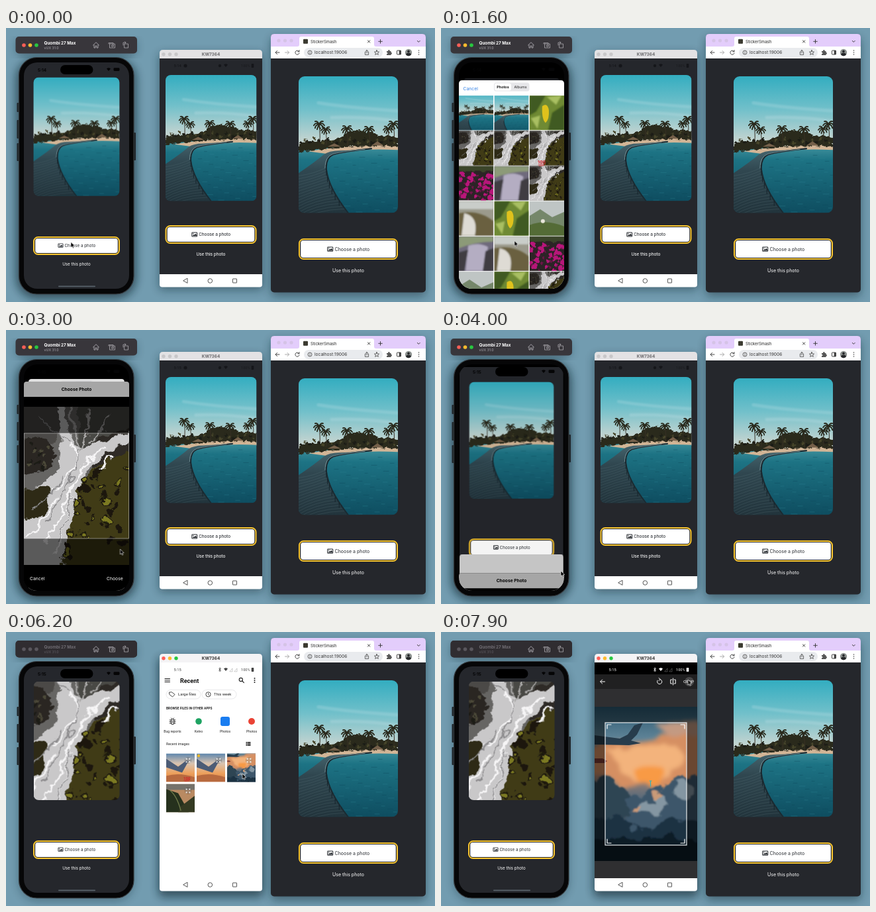
Write an HTML page that moves like this. It is 648 by 414 pixels and loops after 8 s.

```html
<!DOCTYPE html>
<html lang="en">
<head>
<meta charset="utf-8">
<title>Choose a photo</title>
<style>
html, body { margin: 0; width: 100%; height: 100%; overflow: hidden; background: #729cb0; }
svg { display: block; }
text { font-family: Inter, "Open Sans", sans-serif; }
.rb text, text.rb { font-family: Roboto, "Noto Sans", sans-serif; }
.ln { fill: none; stroke-linecap: round; stroke-linejoin: round; }
.mid { text-anchor: middle; }
.b { font-weight: 700; }

.early, .late, .clk14, .clk15, .shot1, .shot2, .tick, .grid, .press { animation: 8s step-end infinite; }
.early { animation-name: early; }
.late { animation-name: late; }
.clk14 { animation-name: clk14; }
.clk15 { animation-name: clk15; }
.shot1 { animation-name: shot1; }
.shot2 { animation-name: shot2; }
.tick { animation-name: tick; }
.grid { animation-name: grid; }
.press { animation-name: press; }
@keyframes early { 0% { opacity: 1 } 65%, 100% { opacity: 0 } }
@keyframes late { 0% { opacity: 0 } 65%, 100% { opacity: 1 } }
@keyframes clk14 { 0% { opacity: 1 } 33.75%, 100% { opacity: 0 } }
@keyframes clk15 { 0% { opacity: 0 } 33.75%, 100% { opacity: 1 } }
@keyframes shot1 { 0% { opacity: 1 } 55%, 100% { opacity: 0 } }
@keyframes shot2 { 0% { opacity: 0 } 55%, 100% { opacity: 1 } }
@keyframes tick { 0% { opacity: 0 } 27.5%, 100% { opacity: 1 } }
@keyframes grid { 0% { opacity: 1 } 48.25%, 100% { opacity: 0 } }
@keyframes press { 0% { opacity: 0 } 97.4%, 100% { opacity: 1 } }

.card, .shade, .sheet, .dim, .editor { animation: 8s cubic-bezier(.32,.72,0,1) infinite; }
.card { animation-name: card; }
.shade { animation-name: shade; }
.sheet { animation-name: sheet; }
.dim { animation-name: dim; }
.editor { animation-name: editor; }
@keyframes card {
  0%, 14.875%, 54.5%, 100% { transform: translate(106.5px,52px) scale(1) translate(-106.5px,-52px) }
  21.125%, 48.25% { transform: translate(106.5px,76px) scale(.911) translate(-106.5px,-52px) }
}
@keyframes shade { 0%, 14.875%, 54.5%, 100% { opacity: 0 } 21.125%, 48.25% { opacity: .25 } }
@keyframes sheet {
  0%, 14.875%, 54.5%, 100% { transform: translate(106.5px,394px) scale(1) translate(-106.5px,0px) }
  21.125%, 29.125% { transform: translate(106.5px,78px) scale(1) translate(-106.5px,0px) }
  35.375%, 48.25% { transform: translate(106.5px,74px) scale(.911) translate(-106.5px,0px) }
}
@keyframes dim { 0%, 29.125% { opacity: 0 } 35.375%, 48.2% { opacity: .12 } 48.25%, 100% { opacity: .23 } }
@keyframes editor {
  0%, 29.125% { transform: translate(0px,394px) }
  35.375%, 48.25% { transform: translate(0px,78px) }
  54.5%, 100% { transform: translate(0px,428px) }
}
.picker { animation: picker 8s ease-out infinite; }
@keyframes picker {
  0%, 72.5% { opacity: 0; transform: translate(0px,24px) }
  77%, 100% { opacity: 1; transform: translate(0px,0px) }
}
.crop { animation: crop 8s linear infinite; }
@keyframes crop { 0%, 85.6% { opacity: 0 } 88.5%, 100% { opacity: 1 } }
.cursor { animation: cursor 8s ease-in-out infinite; }
@keyframes cursor {
  0%, 13% { transform: translate(98px,323.5px) }
  16.25%, 19% { transform: translate(109px,326px) }
  25.5%, 31% { transform: translate(147px,234px) }
  41%, 53% { transform: translate(181px,364px) }
  64%, 71% { transform: translate(292px,310.5px) }
  76.5%, 84% { transform: translate(357px,214px) }
  92%, 100% { transform: translate(373px,72px) }
}
</style>
</head>
<body>
<svg id="stage" width="648" height="414" viewBox="0 0 648 414"></svg>
<script>
const rect = (x, y, w, h, fill, r = 0, more = '') =>
  `<rect x="${x}" y="${y}" width="${w}" height="${h}" rx="${r}" fill="${fill}" ${more}/>`;
const dot = (x, y, r, fill, more = '') => `<circle cx="${x}" cy="${y}" r="${r}" fill="${fill}" ${more}/>`;
const text = (x, y, size, str, fill = '#111', cls = '') =>
  `<text x="${x}" y="${y}" font-size="${size}" fill="${fill}" class="${cls}">${str}</text>`;
const line = (d, color, w = 1, more = '') => `<path class="ln" d="${d}" stroke="${color}" stroke-width="${w}" ${more}/>`;
const fill = (d, color, more = '') => `<path d="${d}" fill="${color}" ${more}/>`;
const at = (x, y, body, s = 1) => `<g transform="translate(${x} ${y}) scale(${s})">${body}</g>`;
const group = (cls, body) => `<g class="${cls}">${body}</g>`;
const filtered = (id, body) => `<g filter="url(#${id})">${body}</g>`;
const photo = (id, x, y, w, h, more = '') => `<use href="#${id}" x="${x}" y="${y}" width="${w}" height="${h}" ${more}/>`;
const scene = (id, w, h, body) =>
  `<symbol id="${id}" viewBox="0 0 ${w} ${h}" preserveAspectRatio="xMidYMid slice">${body}</symbol>`;
const fade = (id, ...stops) => `<linearGradient id="${id}" x2="0" y2="1">${
  stops.map(([o, c]) => `<stop offset="${o}" stop-color="${c}"/>`).join('')}</linearGradient>`;
const clip = (id, x, y, w, h, r) => `<clipPath id="${id}">${rect(x, y, w, h, '#000', r)}</clipPath>`;
const lights = (xs, y, r, colors) => xs.map((x, i) => dot(x, y, r, colors[i % colors.length])).join('');
const shadow = (x, y, w, h, r, o) => rect(x, y, w, h, '#10222c', r, `opacity="${o}" filter="url(#soft)"`);
const times = (n, f) => Array.from({ length: n }, (_, i) => f(i)).join('');

// Ragged edges: noise pushes the shapes about, then a light blur
const ragged = (id, freq, push, blur) => `<filter id="${id}"><feTurbulence type="fractalNoise" baseFrequency="${freq}" numOctaves="4" seed="4"/>` +
  `<feDisplacementMap in="SourceGraphic" scale="${push}" xChannelSelector="R" yChannelSelector="G"/><feGaussianBlur stdDeviation="${blur}"/></filter>`;

const INK = '#25272c', GOLD = '#f9c62f';
const MAC = ['#fe5f57', '#febc2e', '#28c840'];

// Photos
const palm = (x, y, s = 1) => at(x, y, line('M0 0Q-4-5-8 1M0 0Q-5-1-6 5M0 0Q-2-6-6-5M0 0Q4-5 8 1M0 0Q5-1 6 5M0 0Q2-6 6-5M0 0Q0 3 2 6M0 0Q-2 3-3 7', '#28291c', 1.9)
  + line('M0 0Q2 14 1 25', '#383025', 1), s);

const pier = scene('pier', 150, 206,
  rect(0, 0, 150, 112, 'url(#sky)') +
  filtered('blur', line('M30 40Q80 48 150 52M50 62Q100 60 150 68', '#d8ecee', 5, 'opacity=".2"')) +
  rect(0, 106, 150, 100, 'url(#sea)') +
  times(60, i => line(`M${46 + (i * 37) % 102} ${116 + i * 1.5}h${4 + i % 6}`, i % 2 ? '#2f8594' : '#0d4557', .7, 'opacity=".55"')) +
  fill('M14 113Q90 101 150 103V111Q90 108 44 117Z', '#d2b596') +
  filtered('leafy', fill('M0 110Q4 96 18 98T40 95Q54 97 62 93Q74 82 84 83Q95 78 104 85Q115 82 121 91Q136 87 150 92V106Q90 102 0 114Z', '#2a2a1d') +
    times(22, i => dot(4 + i * 6.7, 101 - (i * 5) % 8, 2.2, i % 2 ? '#46452b' : '#1a1c14'))) +
  fill('M44 106l10-5 10 5zM110 104l9-6 9 6z', '#75604a') +
  palm(31, 73) + palm(41, 81, .9) + palm(73, 80) + palm(106, 81) + palm(135, 80, .9) + palm(143, 73) +
  fill('M0 146Q24 130 38 118Q46 112 62 112Q92 111 110 108V110Q70 114 53 119Q41 123 42 140Q44 167 74 206H0Z', 'url(#deck)') +
  times(16, i => line(`M0 ${150 + i * 4.6}Q24 ${147 + i * 3.6} ${43 + i * i * .115} ${137 + i * 4.2}`, '#6d868c', .5, 'opacity=".4"')) +
  line('M110 109Q68 113 52 118Q41 123 42 140Q45 168 75 206', '#1b2a31', 2) +
  line('M100 110Q66 113 52 117Q40 121 40 138', '#8fabae', .7) +
  times(7, i => line(`M${41.5 + i * i * .55} ${134 + i * 9}v7`, '#16242b', 1)));

const mossy = (n, color, r) => times(n, i => {
  const y = 62 + (i * 29) % 150;
  return dot(150 - ((i * 43) % (60 + y * .25)), y, r + i % 4, color);
});
const fall = scene('fall', 180, 270, rect(0, 0, 180, 270, '#666563') + at(25, 45, filtered('rough',
  fill('M-40-60H46L40-10L26 18L-40 4Z', '#4b4946') +
  fill('M-40 6L14 8L30 34L16 62L-40 76Z', '#2b2824') +
  fill('M70-60H170V-6Q112 14 74 26Q66 0 70-60Z', '#4a4844') +
  fill('M92 20L120 0L170-16V30L118 48L90 60Z', '#2e2b26') +
  fill('M44-60Q46 0 62 22Q100 26 170-12V6Q104 34 82 62Q64 110 52 180L42 240H-40V112Q10 92 30 66Q46 30 30-60Z', '#c9c8c9') +
  fill('M-40 90L14 96L18 120L4 144L-40 150Z', '#2d2b17') +
  fill('M72 90L90 62L124 42L170 28V240H40Q54 160 72 90Z', '#3f3b18') +
  mossy(34, '#1d1910', 4) + mossy(15, '#7c7a22', 2) + times(12, i => dot(-14 + (i * 17) % 30, 20 + (i * 13) % 44, 3, i % 2 ? '#4c4838' : '#1c1a17')) +
  line('M52 20Q78 34 60 62Q46 84 20 100M112 26Q76 44 62 84Q46 130 10 190M62 92Q50 134 30 200M-20 176Q10 150 30 110M128 36Q112 48 106 62', '#f6f5f6', 3.2) +
  line('M70 30Q66 64 48 92T16 150M58 104Q48 150 30 190M-10 130Q20 110 40 74M4-30Q24 0 50 16', '#8b8a8c', 2) +
  line('M84-40Q92 0 74 30M56-44Q56-10 70 20M120-30Q110 0 90 16', '#a9a8a7', 3))));

const leaf = scene('leaf', 52, 52, rect(0, 0, 52, 52, '#6f8a34') + filtered('blur',
  fill('M0 0H24L10 24L0 30ZM34 26L52 14V52H28Z', '#3f5a20') + fill('M26 2L48 0L40 14ZM2 34L16 30L12 50Z', '#a9bf62')) +
  fill('M19 16Q27 10 29 22Q30 36 24 41Q18 36 19 16Z', '#e0c21c'));

const bloom = scene('bloom', 52, 52, rect(0, 0, 52, 52, '#2c2426') + filtered('leafy',
  times(38, i => dot((i * 19) % 54, 11 + (i * 11) % 42, 2 + i % 3, i % 3 ? '#b8187a' : '#6d1548')) + rect(-4, -4, 60, 12, '#3a4429')));

const mist = scene('mist', 52, 52, rect(0, 0, 52, 52, '#6f6a7c') + filtered('blur',
  fill('M0 0H52V8Q24 8 0 18Z', '#8c9a78') + fill('M14 14Q30 8 44 16L36 52H10Z', '#b4adc2') +
  fill('M0 24L14 20L8 52H0ZM40 22L52 18V52H36Z', '#3f3d42')));

const haze = scene('haze', 52, 52, rect(0, 0, 52, 52, '#9b9a8c') + filtered('blur',
  rect(0, 0, 52, 12, '#c9cdc9') + fill('M0 18Q30 12 52 30V52H0Z', '#6a6140') + fill('M8 18Q30 22 24 52H4Z', '#dedbd4')));

const hill = scene('hill', 52, 52, rect(0, 0, 52, 52, '#bfc5c4') +
  fill('M0 22L16 12L34 24L52 16V52H0Z', '#75876a') + fill('M0 36Q24 26 52 38V52H0Z', '#546b36') + dot(20, 30, 3, '#e8e6da'));

const cliff = scene('cliff', 43, 43, rect(0, 0, 43, 43, '#b98a62') + rect(0, 0, 43, 9, '#75726b') +
  fill('M0 8L18 14L26 28L34 43H0Z', '#26311d') + fill('M22 34L43 18V43H18Z', '#343a22') + line('M6 10Q16 18 22 40', '#6f7a4a', 1.4));

const wing = scene('wing', 155, 233,
  rect(0, 0, 155, 233, 'url(#dusk)') + filtered('cloud',
  fill('M-20 62Q40 48 80 54Q120 30 180 40V110Q120 132 70 122Q20 116-20 92Z', '#d58f62') +
  fill('M20 66Q70 54 130 62Q140 84 110 100Q84 124 60 114Q34 92 20 66Z', '#f3b37c') +
  fill('M56 92Q84 82 104 92Q98 118 76 122Q58 112 56 92Z', '#f89a45') +
  fill('M90 26Q130 16 180 30V46Q120 52 90 26Z', '#c39a82')) + filtered('puff',
  fill('M-20 118Q20 106 44 124Q60 140 54 166L-20 180Z', '#2f4453') +
  fill('M46 160Q50 134 72 138Q80 116 104 122Q124 98 180 104V260H30Z', '#3c566a') +
  fill('M62 150Q74 138 88 146Q92 124 110 130Q120 148 100 158Q84 166 62 160ZM116 116Q136 104 150 116Q156 134 132 138Z', '#8496a2') +
  fill('M88 128Q98 122 110 128Q104 138 92 138ZM52 154Q60 146 70 150L62 160Z', '#c99a78') +
  fill('M-20 176Q40 158 78 186Q120 160 180 176V260H-20Z', '#1a3143') +
  fill('M-20 204Q60 190 180 206V260H-20Z', '#0d1c28')) +
  fill('M0 43L38 48L50 42L60 28L73 24L64 42L55 51L70 55L52 58L0 57Z', '#273c4c') +
  fill('M0 78h12l7 4-4 3H0Z', '#7d3a34'));

const dawn = scene('dawn', 43, 43, rect(0, 0, 43, 43, 'url(#morn)') +
  fill('M0 8L18 20L30 11L34 11L24 29L0 21Z', '#4c5c76') + fill('M0 34Q20 28 43 36V43H0Z', '#b86a3f'));

// Shared pieces
const pic = fill('M0 1.2Q0 0 1.2 0H7.3Q8.5 0 8.5 1.2V5.6Q8.5 6.8 7.3 6.8H1.2Q0 6.8 0 5.6ZM1 1V5.8H7.5V1Z', '#25292e', 'fill-rule="evenodd"')
  + fill('M1.4 5.3L3.2 3.4L4 4.2L5.7 2.3L7.2 4V5.3Z', '#25292e') + dot(2.4, 2.2, .7, '#25292e');

const controls = (x, y, w, h, size, labelX, useY, cls = '') =>
  rect(x + 1, y + 1, w - 2, h - 2, INK, 6.5, `stroke="${GOLD}" stroke-width="2"`) +
  rect(x + 3.2, y + 3, w - 6.4, h - 6, '#fff', 4) +
  at(labelX - 10.6 * size / 6.6, y + h / 2 - 3.6, pic, size / 6.6) +
  text(labelX, y + h / 2 + size * .36, size, 'Choose a photo', '#25292e', cls) +
  text(x + w / 2, useY, size, 'Use this photo', '#fff', 'mid ' + cls);

const clock = (x, y, size, color, cls = '') =>
  group('clk14', text(x, y, size, '5:14', color, cls)) + group('clk15', text(x, y, size, '5:15', color, cls));

const hundred = (x, y, s) => at(x, y, text(0, 0, 8, '100', '#d3222b', 'b') + line('M1 2.2L13 1M3 4L11 3.2', '#d3222b', .9), s);

const wifi = (x, y, c) => at(x, y, fill('M-4-2Q0-5.4 4-2L0 2.6Z', c), .75);

const defs = '<defs>' +
  fade('sky', [0, '#33adc0'], [.45, '#72c0ca'], [.85, '#c0d3d0'], [1, '#cfd3ca']) +
  fade('sea', [0, '#3f909c'], [.2, '#1d7384'], [1, '#0e4d60']) +
  fade('deck', [0, '#46666f'], [.35, '#304750'], [1, '#22343c']) +
  fade('dusk', [0, '#2b5870'], [.2, '#5d8296'], [.4, '#b98a70'], [.6, '#55697a'], [1, '#0d1c28']) +
  fade('morn', [0, '#5d86ad'], [.35, '#d8c3b0'], [.7, '#eda05c'], [1, '#cc7944']) +
  '<filter id="soft" x="-20%" y="-20%" width="140%" height="140%"><feGaussianBlur stdDeviation="7"/></filter>' +
  '<filter id="blur"><feGaussianBlur stdDeviation="1"/></filter>' +
  ragged('rough', .045, 22, .5) + ragged('leafy', .16, 7, .2) + ragged('cloud', .03, 24, 3) + ragged('puff', .04, 30, .8) +
  clip('phoneScreen', 27, 52, 159, 342, 20) + clip('phonePic', 41.5, 74.5, 130, 179.5, 8) + clip('editPic', 27, 38, 159, 239, 0) +
  clip('droidScreen', 232, 46, 155, 326, 0) + clip('droidPic', 241, 71, 137.5, 190.5, 8) + clip('webPic', 442, 73, 150, 206.5, 9) +
  pier + fall + leaf + bloom + mist + haze + hill + cliff + wing + dawn + '</defs>';

// Phone simulator
const cells = ['pier', 'pier', 'leaf', 'fall', 'fall', 'fall', 'bloom', 'mist', 'fall', 'haze', 'leaf', 'hill',
  'mist', 'haze', 'bloom', 'hill', 'leaf', 'fall'];

const sheet = fill('M27 5Q27 0 32 0H181Q186 0 186 5V360H27Z', '#fff') +
  group('grid',
    text(33.5, 14.5, 6.8, 'Cancel', '#2f7fe6') +
    rect(80, 3.5, 53.5, 13, '#e6e6e9', 3.5) + rect(81, 4.5, 25, 11, '#fff', 3) +
    text(93.5, 12, 5.4, 'Photos', '#111', 'mid b') + text(120, 12, 5.4, 'Albums', '#222', 'mid') +
    cells.map((id, i) => photo(id, 27 + i % 3 * 53.4, 23 + (i / 3 | 0) * 53.2, 52.2, 52.2)).join('') +
    hundred(146, 126, .85) +
    group('tick', rect(133.8, 129.4, 52.2, 52.2, '#fff', 0, 'opacity=".2"') +
      dot(178.5, 175, 4.6, '#1f77e8', 'stroke="#fff" stroke-width=".7"') + line('M176.4 175l1.5 1.7 2.8-3.3', '#fff', .9))) +
  fill('M27 5Q27 0 32 0H181Q186 0 186 5V360H27Z', '#000', 'class="dim"');

const editor = fill('M27 4Q27 0 31 0H182Q186 0 186 4V360H27Z', '#000') +
  '<g clip-path="url(#editPic)">' + photo('fall', 27, 38, 159, 239) + '</g>' +
  rect(27, 38, 159, 40, '#000', 0, 'opacity=".55"') + rect(27, 237, 159, 40, '#000', 0, 'opacity=".55"') +
  rect(27.3, 78, 158.4, 159, 'none', 0, 'stroke="#ddd" stroke-width=".5"') +
  text(36, 300, 6.8, 'Cancel', '#fff') + text(152, 300, 6.8, 'Choose', '#fff') +
  fill('M27 4Q27 0 31 0H182Q186 0 186 4V23H27Z', '#a6a6a6') +
  text(106.5, 14, 6.7, 'Choose Photo', '#000', 'mid b');

const phoneBar = shadow(16, 17, 180, 24, 6, .4) + rect(14.5, 13, 183.5, 25.5, '#38363b', 5) +
  group('early', lights([27, 36.5, 46], 26, 2.8, MAC) + text(57.5, 25, 6.3, 'Quombi 27 Max', '#fff', 'b') + text(57.5, 32, 5.3, 'vUX 31.0', '#aaa8ae')) +
  group('late', rect(14.5, 13, 183.5, 25.5, '#302d31', 5) + lights([27, 36.5, 46], 26, 2.8, ['#5a575d']) +
    text(57.5, 25, 6.3, 'Quombi 27 Max', '#706d73', 'b') + text(57.5, 32, 5.3, 'vUX 31.0', '#625f65')) +
  line('M131.5 26L136 21.7L140.5 26M133 25.5V30H135V27H137V30H139V25.5', '#aba9ae', .9) +
  line('M155 24V22.5H162V28M157 24H164.5V30H156.5V24Z', '#aba9ae', .8) + dot(160.6, 27, 1.4, 'none', 'stroke="#aba9ae" stroke-width=".8"') +
  line('M179 24H184.5V30H179ZM177 26V22H181M179.6 20.7L181 22L179.6 23.3', '#aba9ae', .8);

const phone = group('early', shadow(15, 46, 182, 362, 30, .45)) + shadow(19, 50, 174, 356, 28, .32) + phoneBar +
  [[16.5, 113, 14], [16.5, 139, 28], [16.5, 174, 27], [192, 158, 42]].map(([x, y, h]) => rect(x, y, 4, h, '#20262a', 1)).join('') +
  rect(19.5, 44.5, 173.5, 357.5, '#060607', 27, 'stroke="#34393d" stroke-width="1.2"') +
  '<g clip-path="url(#phoneScreen)">' + rect(27, 52, 159, 342, '#000') +
  group('card', rect(27, 52, 159, 350, INK, 5) + '<g clip-path="url(#phonePic)">' +
    group('shot1', photo('pier', 41.5, 74.5, 130, 179.5)) + group('shot2', photo('fall', 16.5, 29.5, 180, 270)) + '</g>' +
    controls(41, 315, 131, 28, 6.25, 88.5, 359) + rect(27, 52, 159, 350, '#000', 5, 'class="shade"')) +
  rect(82, 56, 49.5, 14, '#000', 7) + clock(48, 65.5, 6.4, '#050506', 'b') +
  wifi(155, 63, '#050506') + rect(162.5, 60.3, 9, 4.6, '#050506', 1.4) +
  rect(79, 389.5, 56, 1.7, '#59636b', .8) +
  group('sheet', sheet) + group('editor', editor) + '</g>';

// Android window
const expand = (x, y) => at(x, y, dot(0, 0, 5, '#000', 'opacity=".22"') +
  line('M-3-1V-3H-1M1-3H3V-1M3 1V3H1M-1 3H-3V1M-3-3L-1-1M3-3L1-1M3 3L1 1M-3 3L-1 1', '#fff', .8));

const status = c => text(253.5, 59, 5.8, '5:15', c) + line('M321.8 55.2L324.4 58.4L323 59.8V53.8L324.4 55.2L321.8 58.4', c, .8) +
  wifi(332, 57, c) + line('M338 59.5L342 55V59.5ZM345 59.5L349 55V59.5Z', c, .5, 'opacity=".5"') +
  text(355, 59, 5.6, '100%', c) + rect(370.7, 54, 3.6, 6, c, .7);

const appIcon = (x, icon, label) => icon + text(x, 152, 5.1, label, '#222', 'mid');
const chip = (x, label) => rect(x, 87.5, 52, 13.5, '#fff', 6.7, 'stroke="#e2e3e5" stroke-width=".8"') + text(x + 18, 96.4, 5.9, label, '#222');
const bug = rect(249.3, 131.5, 4.6, 8, 'none', 2.2, 'stroke="#333" stroke-width="1.1"') +
  line('M247 133h2M247 135.5h2M247 138h2M254 133h2M254 135.5h2M254 138h2M249.5 130l1 1.4M253.5 130l-1 1.4M250.8 134.5h1.6M250.8 136.6h1.6', '#333', .9);

const picker = rect(232, 46, 155, 360, '#fff') + status('#444') +
  line('M240 70.5h7.5M240 73h7.5M240 75.5h7.5', '#222', 1) + text(263, 76.6, 9, 'Recent', '#111', 'b') +
  dot(354.8, 72, 2.6, 'none', 'stroke="#222" stroke-width="1.1"') + line('M356.8 74L359.4 76.6', '#222', 1.1) +
  [70, 73, 76].map(y => dot(375.5, y, 1, '#222')).join('') +
  chip(242, 'Large files') + line('M247 91L250.5 90.8L255 94.5L251.5 98L247 94.5Z', '#333', .9) +
  chip(296, 'This week') + dot(305.5, 94.3, 3.6, 'none', 'stroke="#333" stroke-width=".9"') + line('M305.5 92.3V94.5L307 95.5', '#333', .8) +
  text(242, 117, 4.85, 'BROWSE FILES IN OTHER APPS', '#222', 'b') +
  appIcon(251.5, bug, 'Bug reports') + appIcon(291, dot(291, 135, 4.8, '#1ea362'), 'Kelvo') +
  appIcon(331, rect(324, 128, 14, 14, '#1a7df0', 3), 'Photos') + appIcon(371, dot(371, 135, 5, '#ea4335'), 'Photos') +
  text(242, 171, 5.3, 'Recent images', '#222') +
  rect(362.5, 166, 7, 6, '#333', .5) + line('M362.5 168h7M362.5 170h7M364.6 166v6', '#fff', .5) +
  photo('dawn', 242, 183.5, 43, 43) + photo('dawn', 288, 183.5, 43, 43) + photo('wing', 334, 183.5, 43, 43) + photo('cliff', 242, 229.5, 43, 43) +
  hundred(268, 222.5, .75) + dot(291, 187, 2.2, '#e8b62c') +
  expand(275, 194) + expand(321, 194) + expand(367, 194) + expand(275, 240);

const crop = rect(232, 46, 155, 326, '#2f2f31') + rect(232, 46, 155, 18, '#000') + rect(232, 64, 155, 22, '#202021') + status('#fff') +
  line('M247.5 75H240.8M243.6 72L240.6 75L243.6 78', '#fff', 1) +
  line('M327 73.2A3.6 3.6 0 1 0 331 71.5M329 69.6L331.2 71.5L329 73.4', '#fff', 1) +
  line('M350.5 70V80M348.8 72H346.8V78H348.8M352.2 72H354.2V78H352.2', '#fff', 1) +
  group('press', dot(375, 75, 7, '#fff', 'opacity=".18"')) + text(366, 77.4, 6.2, 'CROP', '#fff') +
  photo('wing', 232, 113, 155, 233) +
  fill('M232 113H387V346H232ZM248 137V322H371V137Z', '#000', 'fill-rule="evenodd" opacity=".5"') +
  rect(248, 137, 123, 185, 'none', 0, 'stroke="#e6eaec" stroke-width="1.2"') +
  line('M251 146V140H257M362 140H368V146M368 313V319H362M257 319H251V313', '#fff', 1.2) +
  line('M315 225H318M316.5 225V233', '#35b3bd', 1.2);

const droidTitle = (bar, colors, ink) => fill('M232 38Q232 33 237 33H382Q387 33 387 38V46H232Z', bar) +
  lights([238, 247.5, 257], 39.8, 2.7, colors) + text(309.5, 42.2, 6.4, 'KW7364', ink, 'mid b');

const droid = shadow(231, 38, 157, 358, 6, .42) + group('late', shadow(231, 40, 157, 362, 6, .35)) +
  group('early', droidTitle('#e3e2e4', ['#c8c7c9'], '#6a696c')) + group('late', droidTitle('#f4f3f5', MAC, '#333')) +
  rect(232, 362, 155, 29.5, '#fff', 4) + rect(232, 46, 155, 326, INK) +
  '<g class="rb" clip-path="url(#droidScreen)">' +
  clock(253.5, 59, 5.8, '#121316') + `<g opacity=".8">` + dot(271, 57, 2.6, '#121316') + dot(323, 57, 2.2, '#121316') + wifi(332, 57, '#121316') +
  text(355, 59, 5.6, '100%', '#17181b') + rect(370.7, 54, 3.6, 6, '#121316', .7) + '</g>' +
  '<g clip-path="url(#droidPic)">' + photo('pier', 241, 71, 137.5, 190.5) + '</g>' +
  controls(240.5, 298, 138, 28, 6.85, 291.3, 344.3, 'rb') +
  group('picker', picker) + group('crop', crop) + '</g>' +
  line('M274 378.6V385.4L268 382Z', '#444', .9) + dot(308.3, 382, 3.3, 'none', 'stroke="#444" stroke-width=".9"') +
  rect(342.5, 379, 6, 6, 'none', .3, 'stroke="#444" stroke-width=".9"');

// Browser window
const web = shadow(400, 15, 234, 390, 6, .45) + rect(400, 9, 234, 390.5, INK, 5) +
  fill('M400 14Q400 9 405 9H629Q634 9 634 14V28H400Z', '#e3cdfb') +
  lights([412, 421.5, 431], 19, 2.6, ['#d5c3e6']) +
  fill('M440 28Q443 28 443 25V16Q443 13 446 13H553Q556 13 556 16V25Q556 28 559 28Z', '#fff') +
  rect(449, 16.8, 7, 7, '#3b3a30', 1) + text(460, 22.8, 6.1, 'StickerSmash', '#222') +
  line('M546.4 18.7l3.4 3.4M549.8 18.7l-3.4 3.4', '#333', .9) + line('M565.5 17.5v5.6M562.7 20.3h5.6', '#333', .9) +
  line('M621.3 19.3l2 2 2-2', '#333', .9) + rect(400, 28, 234, 18, '#fff') +
  line('M413 37H407M409.6 34.4L407 37L409.6 39.6', '#444', 1) + line('M421.5 37h6M425 34.4L427.6 37L425 39.6', '#aaa', 1) +
  line('M442.6 35.4A3.1 3.1 0 1 0 443 38M443 33.6V35.8H440.7', '#444', 1) +
  rect(450, 30, 119, 14, '#e9ebee', 7) + dot(459, 37, 3, 'none', 'stroke="#444" stroke-width=".8"') + line('M459 36.9V38.5M459 35.4v.1', '#444', .8) +
  text(466, 39.4, 6.6, 'localhost:19006', '#333') +
  line('M543.4 36H542.4V40.4H547.6V36H546.6M545 38V33.4M543.6 34.7L545 33.3L546.4 34.7', '#444', .8) +
  line('M560 33.4L561 36L563.6 36.1L561.6 37.8L562.3 40.4L560 39L557.7 40.4L558.4 37.8L556.4 36.1L559 36Z', '#444', .8) +
  fill('M575 35H577Q577 33 578.4 33T579.8 35H581.6V37Q583 37 583 38.2T581.6 39.4V41H575V39.2Q576.6 39 576.6 38T575 36.8Z', '#555') +
  rect(590.5, 34, 6, 6, 'none', .5, 'stroke="#444" stroke-width="1"') + rect(593.6, 34, 3, 6, '#444') +
  dot(608, 37, 5.2, '#8d9290') + dot(608, 35.4, 1.8, '#25272a') + fill('M604 40.3Q604.4 37.4 608 37.4T612 40.3Q608 44 604 40.3Z', '#25272a') +
  [34, 37, 40].map(y => dot(623.5, y, .8, '#444')).join('') +
  '<g clip-path="url(#webPic)">' + photo('pier', 442, 73, 150, 206.5) + '</g>' +
  controls(442, 318, 150, 32, 7.05, 496.5, 368.5);

const cursor = group('cursor', fill('M0 0V8L1.9 6.4L3.2 9.2L4.4 8.6L3.2 5.9L5.7 5.6Z', '#000', 'stroke="#fff" stroke-width=".6"'));

document.getElementById('stage').innerHTML = defs + rect(0, 0, 648, 414, '#729cb0') + phone + droid + web + cursor;
</script>
</body>
</html>
```
